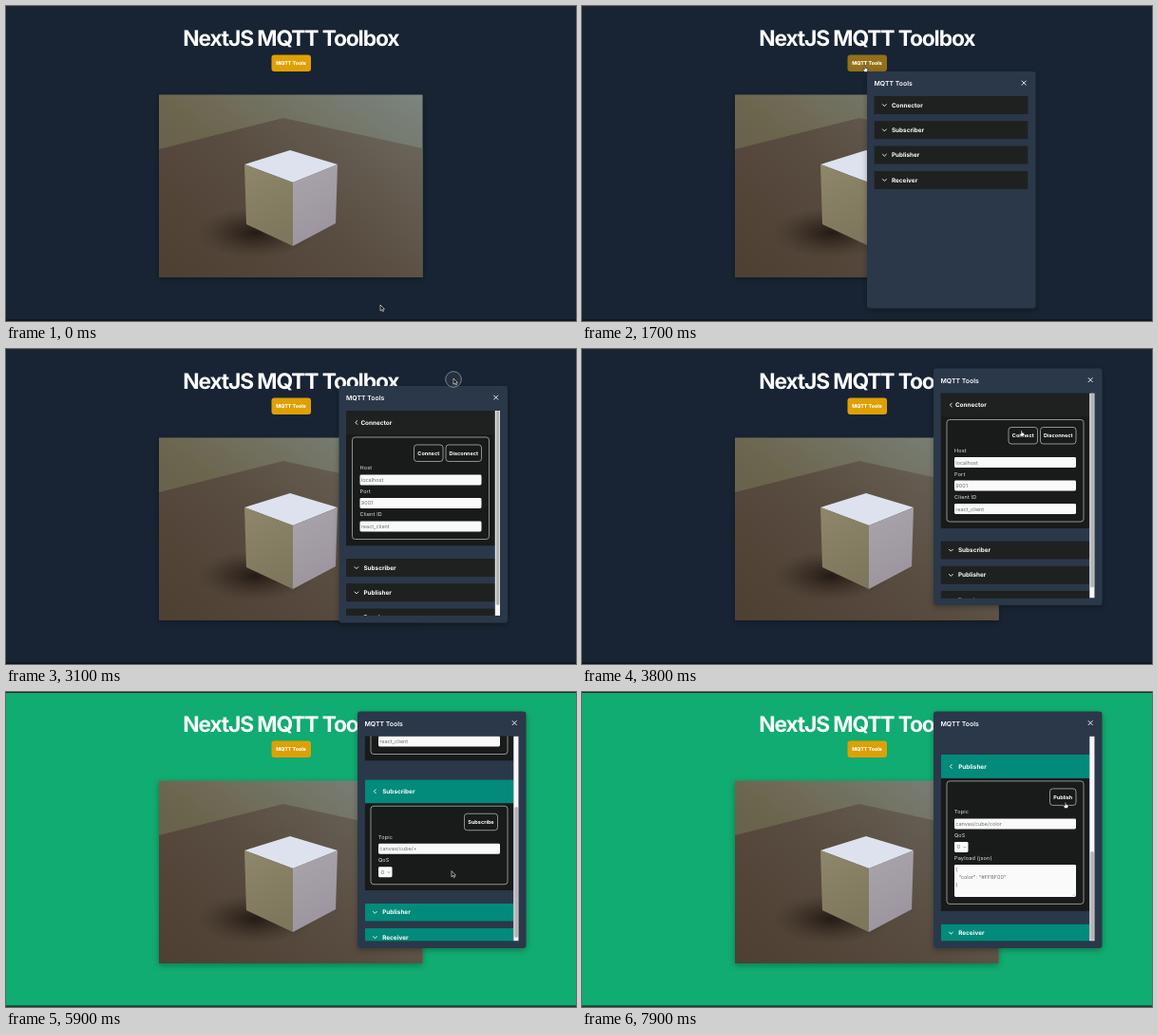
An HTML page that plays this animation: 600 by 332 pixels, repeating every 8 s.

```html
<!DOCTYPE html>
<html lang="en">
<head>
<meta charset="utf-8">
<title>MQTT Toolbox</title>
<style>
html, body { margin: 0; width: 100%; height: 100%; overflow: hidden; background: #182433; }
#stage { display: block; width: 600px; height: 332px; }
text { font: 5.5px Inter, sans-serif; fill: #fff; text-rendering: geometricPrecision; white-space: pre; }
#title { font-size: 22.8px; font-weight: 700; letter-spacing: -.05em; }
.bold { font-weight: 700; }
.head { font-size: 6.4px; font-weight: 700; }
.label { fill: #e4e4e4; letter-spacing: .03em; }
.value { fill: #6c6f73; }
.line { fill: none; stroke: #fff; stroke-width: .9; }
.frame, .btn { fill: none; stroke: #c4c4c4; stroke-width: .7; }
.field { fill: #fafafa; }
</style>
</head>
<body>
<svg id="stage" viewBox="0 0 600 332">
  <defs>
    <linearGradient id="wall" x1="0" y1="1" x2="1" y2="0">
      <stop stop-color="#62583f"/><stop offset=".5" stop-color="#6c664f"/><stop offset="1" stop-color="#7b8580"/>
    </linearGradient>
    <linearGradient id="floor" x1="0" y1=".9" x2="1" y2=".2">
      <stop stop-color="#4e4033"/><stop offset=".5" stop-color="#584b3f"/><stop offset="1" stop-color="#6a6459"/>
    </linearGradient>
    <linearGradient id="left" x1="0" y1="0" x2=".3" y2="1">
      <stop stop-color="#8f876b"/><stop offset="1" stop-color="#7f775d"/>
    </linearGradient>
    <linearGradient id="right" x1="0" y1="0" x2=".3" y2="1">
      <stop stop-color="#aaa4ad"/><stop offset="1" stop-color="#9c959f"/>
    </linearGradient>
    <radialGradient id="shade">
      <stop stop-color="#1d1611" stop-opacity=".9"/><stop offset=".45" stop-color="#2a2019" stop-opacity=".55"/><stop offset="1" stop-color="#3a2e25" stop-opacity="0"/>
    </radialGradient>
    <filter id="soft" x="-10%" y="-10%" width="120%" height="120%">
      <feDropShadow dx="0" dy="2" stdDeviation="3" flood-opacity=".3"/>
    </filter>
  </defs>
  <rect id="page" width="600" height="332"/>
  <text id="title" x="299.8" y="42" text-anchor="middle">NextJS MQTT Toolbox</text>
  <rect id="open" x="279.5" y="51.5" width="41.5" height="17.5" rx="3"/>
  <text x="300" y="62" text-anchor="middle" style="font-size:5.3px;font-weight:800">MQTT Tools</text>

  <rect x="161" y="93.5" width="277.5" height="192.5" fill="url(#wall)" filter="url(#soft)"/>
  <path d="M161 151L292 118L438.5 150V286H161Z" fill="url(#floor)"/>
  <ellipse cx="262" cy="239" rx="62" ry="27" fill="url(#shade)"/>
  <path d="M251 167L299 152L349 167L302 186Z" fill="#dde2ee"/>
  <path d="M251 167L302 186V253L253 230Z" fill="url(#left)"/>
  <path d="M302 186L349 167L347 229L302 253Z" fill="url(#right)"/>

  <g id="panel">
    <rect width="177.5" height="249.5" rx="3" fill="#2b384a" filter="url(#soft)"/>
    <text x="7.5" y="15.2" style="font-size:6.9px;font-weight:600">MQTT Tools</text>
    <path class="line" d="M162.8 9.7l4.8 4.8m0-4.8l-4.8 4.8"/>
    <svg x="7.5" y="26" width="162" height="216">
      <g id="list"></g>
      <g id="bar">
        <rect x="156.8" width="5.6" height="216" fill="#f6f6f6"/>
        <rect id="thumb" x="157.8" width="3.6" rx="1.8" fill="#b4b4b4"/>
      </g>
    </svg>
  </g>

  <g id="pageBar">
    <rect y="327" width="600" height="5" fill="#eef0f2"/>
    <rect id="pageThumb" y="328" height="3.4" rx="1.7" fill="#b3b6ba"/>
  </g>
  <rect width="600" height="1" fill="#26292c"/>
  <rect id="edge" y="330.3" width="600" height="1.7" fill="#0f151c"/>
  <g id="cursor">
    <circle id="ring" cy="-1" r="8.3" fill="#fff" fill-opacity=".06" stroke="#78828f" stroke-width="1"/>
    <path id="arrow" d="M0-2V4.2L1.5 3L2.5 5L3.5 4.5L2.6 2.7L4.4 2.5Z" fill="#111" stroke="#fff" stroke-width=".6"/>
    <path id="hand" d="M-.7-2.5Q0-3.2 .6-2.5V-.6L2.8 0Q3.2 1.8 2.2 3.4H-1L-2.5 .8Q-2.2 0-.7 .9Z" fill="#fff" stroke="#111" stroke-width=".6"/>
  </g>
</svg>
<script>
const $ = id => document.getElementById(id);
const set = (id, attrs) => { for (const k in attrs) $(id).setAttribute(k, attrs[k]); };
const show = (id, on) => { $(id).style.display = on ? '' : 'none'; };

// Form parts, placed relative to the top left of an open section
const frame = h => `<rect class="frame" x="6.5" y="28" width="144" height="${h}" rx="3"/>`;
const button = (id, x, w, label) => `<g id="${id}"><rect class="btn" x="${x}" y="36" width="${w}" height="17.5" rx="3"/>
  <text class="bold" x="${x + w / 2}" y="46.8" text-anchor="middle">${label}</text></g>`;
const field = (y, label, lines, w = 128, h = 11) => `<text class="label" x="14.5" y="${y}">${label}</text>
  <rect class="field" x="14.5" y="${y + 5}" width="${w}" height="${h}" rx="1.4"/>` +
  lines.map((s, i) => `<text class="value" x="15.8" y="${y + 12.5 + i * 7.6}">${s}</text>`).join('');
const qos = field(87, 'QoS', ['&nbsp;0'], 14.5) +
  '<path d="M24 97l1.4 1.4l1.4-1.4" fill="none" stroke="#777" stroke-width=".6"/>';

const sections = [
  { name: 'Connector', size: 117.5, start: 1900, body: frame(107.5) +
    button('connect', 71.5, 30.5, 'Connect') + button('connected', 65, 37, 'Connected') +
    button('disconnect', 105, 37.5, 'Disconnect') +
    field(62.5, 'Host', ['localhost']) + field(87, 'Port', ['9001']) + field(111.5, 'Client ID', ['react_client']) },
  { name: 'Subscriber', size: 92, start: 4780, body: frame(82.5) +
    button('subscribe', 105, 35, 'Subscribe') + button('again', 64.5, 34, 'Subscribe') +
    button('unsubscribe', 101, 41.5, 'Unsubscribe') + field(62.5, 'Topic', ['canvas/cube/+']) + qos },
  { name: 'Publisher', size: 140, start: 7000, body: frame(129.5) +
    button('publish', 115, 27.5, 'Publish') + field(62.5, 'Topic', ['canvas/cube/color']) + qos +
    field(111, 'Payload (json)', ['{', '  "color": "#FFBF00"', '}'], 128, 34) +
    '<path d="M139 149l2.5-2.5m-1 2.5l1-1" stroke="#999" stroke-width=".4"/>' },
  { name: 'Receiver', size: 0, start: Infinity, body: '' }
];
$('list').innerHTML = sections.map(({ name, body }) => `<svg id="${name}">
  <rect width="100%" height="100%" fill="#191a1a"/>
  <g id="${name}Body">${body}</g>
  <rect id="${name}Head" width="100%"/>
  <path id="${name}Mark" class="line" d="M-2.2-1.1L0 1.1L2.2-1.1"/>
  <text id="${name}Text" class="head">${name}</text></svg>`).join('');
for (const part of $('connected').children) part.style.opacity = .25;

const clamp = v => Math.max(0, Math.min(1, v));
const ease = v => v * v * (3 - 2 * v);
const ramp = (t, from, length) => ease(clamp((t - from) / length));
// Eased position along stops of [time, x, y]
function along(t, stops) {
  const i = stops.findIndex(s => s[0] > t);
  if (i < 0) return stops[stops.length - 1].slice(1);
  if (!i) return stops[0].slice(1);
  const [a, b] = [stops[i - 1], stops[i]], k = ramp(t, a[0], b[0] - a[0]);
  return [a[1] + (b[1] - a[1]) * k, a[2] + (b[2] - a[2]) * k];
}
const within = (t, spans) => spans.some(([a, b]) => t >= a && t < b);

const pointer = [[100, 394, 317], [850, 298, 66], [1720, 298, 66], [1880, 345, 104], [2050, 345, 104],
  [2250, 415, 82], [2500, 584, 51], [2600, 584, 51], [2700, 480, 70], [2880, 300, 100], [3100, 471, 33],
  [3300, 485, 46], [3550, 485, 46], [3850, 461, 92], [4200, 461, 92], [4480, 572, 150], [4740, 469, 212],
  [5450, 469, 212], [5950, 469, 190], [6200, 458, 131], [6450, 458, 131], [6800, 461, 226],
  [7450, 461, 226], [7800, 509, 119]];
const drag = [[2250, 300, 69], [2500, 468.5, 24], [2600, 468.5, 24], [2700, 365, 50], [2900, 178, 82],
  [3100, 350.5, 39], [3300, 370, 20.5]];

function draw(t) {
  const online = t >= 4000, subscribed = t >= 6350;
  set('page', { fill: online ? '#10ac71' : '#182433' });
  set('edge', { fill: online ? '#1d3a30' : '#0f151c' });
  set('open', { fill: within(t, [[830, 1780]]) ? '#94701a' : '#dfa005' });

  const [px, py] = along(t, drag), appear = ramp(t, 1300, 200), scale = .95 + .05 * appear;
  set('panel', { transform: `translate(${px} ${py}) scale(${scale})`, opacity: appear });
  const overflow = px + 178 > 600;
  show('pageBar', overflow);
  set('pageThumb', { width: 360000 / (px + 178) });

  // Stack the sections, with wider gaps around open ones
  const opens = sections.map(s => ramp(t, s.start, 260));
  let end = 0;
  const boxes = sections.map(({ size }, i) => {
    const o = opens[i], head = 19 + 6 * o;
    const y = i ? end + 7.3 + 6.2 * (opens[i - 1] + o) : 0;
    end = y + head + size * o;
    return { y, head, o, height: end - y };
  });
  const long = end > 216.5;
  const scroll = Math.min(Math.max(0, end - 216), 121.5 * ramp(t, 5550, 400) + 158 * ramp(t, 7270, 250));
  sections.forEach(({ name }, i) => {
    const { y, head, o, height } = boxes[i];
    set(name, { y: y - scroll, width: long ? 156.8 : 162, height });
    set(name + 'Body', { transform: `translate(0 ${head - 25})` });
    set(name + 'Head', { height: head, fill: online ? '#028a7b' : '#1f2121' });
    set(name + 'Mark', { transform: `translate(10.9 ${head / 2}) rotate(${90 * o})` });
    set(name + 'Text', { x: online ? 18.7 : 18.4 - 3 * o, y: head / 2 + 2.2 });
  });
  show('bar', long);
  set('thumb', { y: scroll * 216 / end, height: 216 * 216 / end });

  show('connect', !online);
  show('connected', online);
  show('subscribe', !subscribed);
  show('again', subscribed);
  show('unsubscribe', subscribed);

  const [cx, cy] = along(t, pointer);
  const hand = within(t, [[830, 2130], [3800, 4270], [4690, 5600], [6150, 8000]]);
  set('cursor', { transform: `translate(${cx} ${cy})` });
  show('hand', hand);
  show('arrow', !hand);
  show('ring', within(t, [[2250, 3350]]));
}

const begin = performance.now();
function tick() {
  draw((performance.now() - begin) % 8000);
  requestAnimationFrame(tick);
}
tick();
</script>
</body>
</html>
```
